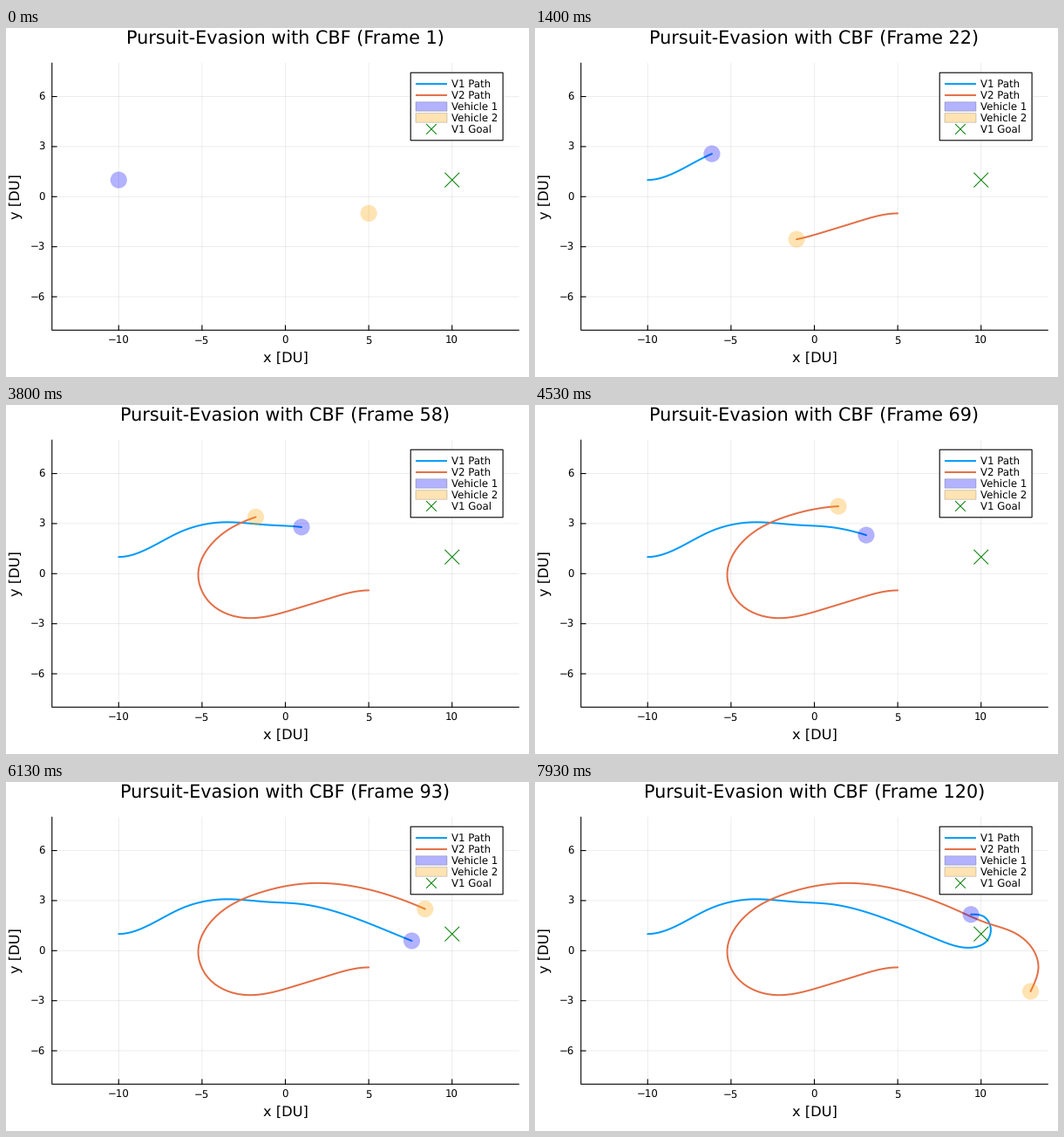
These frames come from a looping animation (600x400 px, 8000 ms). A matplotlib script:

```python
import numpy as np
import matplotlib.pyplot as plt
from matplotlib.animation import FuncAnimation
from matplotlib.patches import Circle, Rectangle

plt.rcParams.update({"font.family": "DejaVu Sans", "text.hinting": "none"})

W, H, DPI = 600, 400, 100
STEPS, LOOP_MS, TICK_MS = 120, 8000, 20
PX = 72 / DPI                      # points per pixel
UNIT, CX, CY = 19.125, 320.5, 193.3
PATH_COLORS = "#009AFA", "#E36F47"
FILLS = (0, 0, 1, 0.3), (1, 0.647, 0, 0.3)
GRID = (0, 0, 0, 0.1)

# Key points of the two manoeuvres, in distance units
PURSUED = [(-10, 1), (-8.39, 1.43), (-6.14, 2.57), (-3.95, 3.07),
           (-1.07, 2.92), (0.97, 2.79), (3.11, 2.31), (7.58, 0.59),
           (9.39, 0.18), (10.3, 0.53), (10.58, 1.35), (10.14, 2.06),
           (9.39, 2.17)]
PURSUER = [(5, -1), (2.59, -1.5), (0.5, -2.14), (-1.09, -2.56),
           (-2.64, -2.63), (-4.63, -1.63), (-5.23, -0.04), (-4.05, 2.16),
           (-1.73, 3.41), (1.49, 4.04), (4.94, 3.68), (8.42, 2.48),
           (10.43, 1.63), (11.9, 1.12), (12.89, 0.38), (13.44, -0.87),
           (12.97, -2.44)]


def sx(x):
    return CX + UNIT * x


def sy(y):
    return CY - UNIT * y


def spline(points, heading, n=4000):
    """Cubic spline with a given start direction and a free end."""
    p = np.array(points, float)
    h = np.hypot(*np.diff(p, axis=0).T)
    t = np.r_[0, np.cumsum(h)]
    slope = np.diff(p, axis=0) / h[:, None]
    a, rhs = np.eye(len(p)), np.zeros_like(p)
    a[0, :2] = 2 * h[0], h[0]
    rhs[0] = 6 * (slope[0] - heading)
    for i in range(1, len(p) - 1):
        a[i, i - 1:i + 2] = h[i - 1], 2 * (h[i - 1] + h[i]), h[i]
        rhs[i] = 6 * (slope[i] - slope[i - 1])
    m = np.linalg.solve(a, rhs)
    s = np.linspace(0, t[-1], n)
    k = np.clip(np.searchsorted(t, s, side="right") - 1, 0, len(h) - 1)
    u, v, hk = (s - t[k])[:, None], (t[k + 1] - s)[:, None], h[k][:, None]
    return ((m[k] * v**3 + m[k + 1] * u**3) / (6 * hk)
            + (p[k] / hk - m[k] * hk / 6) * v
            + (p[k + 1] / hk - m[k + 1] * hk / 6) * u)


def track(points, heading):
    """Stage positions at constant speed, one per step."""
    c = spline(points, heading)
    d = np.r_[0, np.cumsum(np.hypot(*np.diff(c, axis=0).T))]
    s = np.linspace(0, d[-1], STEPS)
    return sx(np.interp(s, d, c[:, 0])), sy(np.interp(s, d, c[:, 1]))


fig = plt.figure(figsize=(W / DPI, H / DPI), dpi=DPI, facecolor="white")
ax = fig.add_axes([0, 0, 1, 1])
ax.set_xlim(0, W)
ax.set_ylim(H, 0)
ax.axis("off")


def line(x, y, color="black", width=1.1, z=1, **kw):
    return ax.plot(x, y, color=color, lw=width * PX, zorder=z, snap=False,
                   **kw)[0]


def label(x, y, text, size, ha="center", z=1, **kw):
    return ax.text(x, y, text, fontsize=size * PX, ha=ha, va="baseline",
                   zorder=z, **kw)


def box(x, y, w, h, fill, edge, width, z):
    ax.add_patch(Rectangle((x, y), w, h, fc=fill, ec=edge, lw=width * PX,
                           zorder=z, snap=False))


def cross(x, y, r, z):
    for s in (1, -1):
        line([x - r, x + r], [y - s * r, y + s * r], "green", 1, z)


# Grid, ticks and axes
left, right, top, bottom = sx(-14), sx(14), sy(8), sy(-8)
for v in range(-10, 11, 5):
    x = sx(v)
    line([x, x], [top, bottom], GRID, 0.7, 0)
    line([x, x], [bottom, bottom - 5.3])
    label(x - 0.4, 362, str(v).replace("-", "\u2212"), 11.8)
for v in range(-6, 7, 3):
    y = sy(v)
    line([left, right], [y, y], GRID, 0.7, 0)
    line([left, left + 5.3], [y, y])
    label(44.7, y + 4.3, str(v).replace("-", "\u2212"), 11.8, "right")
line([left, left, right], [top, bottom, bottom])
label(320.5, 382.6, "x [DU]", 16.3)
label(16, 192.7, "y [DU]", 16.3, rotation=90, rotation_mode="anchor")
title = label(320.5, 18.4, "", 20.8)

# Vehicles, paths and goal
tracks = track(PURSUED, (1, 0)), track(PURSUER, (-1, 0))
paths = [line([], [], c, 2, 2, solid_capstyle="round") for c in PATH_COLORS]
cars = [ax.add_patch(Circle((0, 0), UNIT / 2, fc=c, lw=0, zorder=3))
        for c in FILLS]
cross(sx(10), sy(1), 8, 4)

# Legend
box(464.2, 51.2, 105.9, 77.6, "white", "black", 1.1, 5)
names = ["V1 Path", "V2 Path", "Vehicle 1", "Vehicle 2", "V1 Goal"]
rows = [64.1 + 12.95 * i for i in range(5)]
for y, name in zip(rows, names):
    label(511.4, y + 4.2, name, 11.7, "left", 6)
for y, c in zip(rows, PATH_COLORS):
    line([470, 506], [y, y], c, 2, 6, solid_capstyle="butt")
for y, c in zip(rows[2:], FILLS):
    box(470, y - 5.2, 36, 10.4, c, (0, 0, 0, 0.3), 0.6, 6)
cross(488, rows[4], 5.5, 6)


def draw(tick):
    # Steps start on the nearest clock tick
    i = int((tick + 0.75) * TICK_MS * STEPS / LOOP_MS)
    i = min(i, STEPS - 1)
    title.set_text(f"Pursuit-Evasion with CBF (Frame {i + 1})")
    for (x, y), path, car in zip(tracks, paths, cars):
        path.set_data(x[:i + 1], y[:i + 1])
        car.center = x[i], y[i]
    return [title, *paths, *cars]


anim = FuncAnimation(fig, draw, frames=LOOP_MS // TICK_MS, interval=TICK_MS,
                     repeat=True, repeat_delay=0, blit=False)
plt.show()
```
